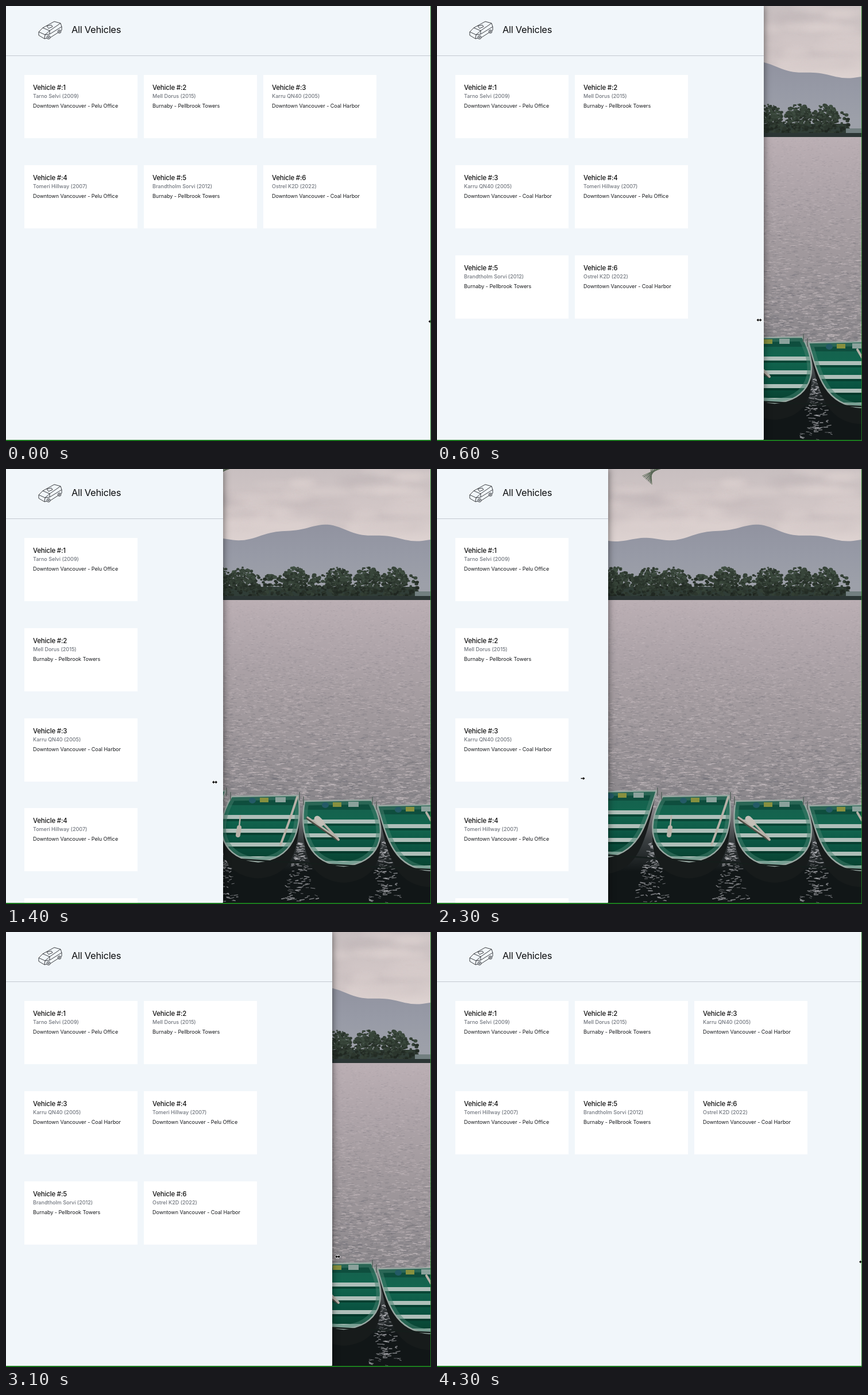
Recreate the animation shown at these times as an HTML page with a canvas. Size 740 by 757 pixels, loop 4.5 s.

```html
<!DOCTYPE html>
<html lang="en">
<head>
<meta charset="utf-8">
<title>All Vehicles</title>
<style>
  html, body { margin: 0; width: 100%; height: 100%; overflow: hidden; }
  #stage { position: absolute; left: 0; top: 0; width: 740px; height: 757px; overflow: hidden; font-family: Inter, Roboto, sans-serif; }
  #stage canvas { position: absolute; left: 0; top: 0; }
  #panel { position: absolute; left: 0; top: 0; height: 756px; overflow: hidden; background: #f1f6fa; box-shadow: 0 0 13px rgba(0,0,0,.55); border-bottom-right-radius: 3px; }
  #panel svg { position: absolute; left: 56px; top: 26px; }
  h1 { position: absolute; left: 114px; top: 30px; margin: 0; font-size: 16.5px; line-height: 22px; font-weight: 400; letter-spacing: -.3px; color: #0c0d0f; white-space: nowrap; }
  hr { position: absolute; left: 0; top: 85.5px; width: 100%; height: 1px; margin: 0; border: 0; background: #c3c8d1; }
  .card { position: absolute; width: 196.5px; height: 110px; background: #fff; white-space: nowrap; }
  .card * { position: absolute; left: 15px; margin: 0; line-height: 16px; }
  .card h2 { top: 14px; font-size: 11.4px; font-weight: 500; letter-spacing: -.15px; color: #111; }
  .card p { top: 29px; font-size: 9px; font-weight: 500; color: #70757d; }
  .card span { top: 46px; font-size: 9px; letter-spacing: -.03px; color: #16181b; }
  #cursor { position: absolute; left: -6px; top: -5px; }
  #edge { position: absolute; inset: 0; border: solid #1b7a1e; border-width: 0 1px 2px 0; }
</style>
</head>
<body>
<div id="stage">
  <canvas id="photo" width="740" height="757"></canvas>
  <div id="panel">
    <svg width="43" height="34" fill="none" stroke="#25282c" stroke-width=".9" stroke-linejoin="round">
      <path d="M8 12 28 1 39 4 20 17ZM8 12 1 19 12 24 20 17M1 19V25L11 31 15 30M12 24 11 31M20 17 20 23 12 24M39 4 41 10 20 23M41 10V16L39 18M21 29 35 20M15 9 23 7 25 10 18 13Z"/>
      <circle cx="18" cy="28.5" r="3"/><circle cx="18" cy="28.5" r="1"/>
      <circle cx="37" cy="18.5" r="2.8"/><circle cx="37" cy="18.5" r="1"/>
    </svg>
    <h1>All Vehicles</h1>
    <hr>
  </div>
  <svg id="cursor" width="12" height="10" stroke="#fff" stroke-width="1.2" paint-order="stroke" fill="#000">
    <path id="arrow"/>
  </svg>
  <div id="edge"></div>
</div>
<script>
const W = 740, H = 757, LEFT = 285, SHORE = 228, LOOP = 4500, STEP = 100;
const $ = id => document.getElementById(id);
const g = $('photo').getContext('2d');

let seed = 11;
const rnd = () => (seed = (seed * 16807) % 2147483647) / 2147483647;
const range = (a, b) => a + (b - a) * rnd();
const repeat = (n, draw) => { for (let i = 0; i < n; i++) draw(i); };

function shade(y0, y1, colors) {
  const s = g.createLinearGradient(0, y0, 0, y1);
  colors.forEach((c, i) => s.addColorStop(i / (colors.length - 1), c));
  return s;
}
function ellipse(x, y, rx, ry, color) {
  g.fillStyle = color;
  g.beginPath();
  g.ellipse(x, y, rx, ry, 0, 0, 7);
  g.fill();
}
function rect(x, y, w, h, color) {
  g.fillStyle = color;
  g.fillRect(x, y, w, h);
}
function line(width, color, x0, y0, x1, y1, sag = 0) {
  g.lineWidth = width;
  g.strokeStyle = color;
  g.beginPath();
  g.moveTo(x0, y0);
  g.quadraticCurveTo((x0 + x1) / 2, (y0 + y1) / 2 + sag, x1, y1);
  g.stroke();
}

function sky() {
  rect(0, 0, W, 240, shade(0, 130, ['#c8bfc0', '#d1c6c6', '#ded3d1']));
  g.filter = 'blur(6px)';
  repeat(45, () => ellipse(range(LEFT, W), range(0, 105), range(20, 70), range(3, 8),
    rnd() < .45 ? 'rgba(182,173,176,.3)' : 'rgba(233,221,217,.32)'));
  g.filter = 'none';
}

function hills() {
  const ridge = x => 123 - 24 * Math.exp(-(((x - 545) / 85) ** 2)) + 3 * Math.cos((x - 412) / 16);
  g.beginPath();
  g.moveTo(LEFT, SHORE);
  for (let x = LEFT; x <= W; x += 5) g.lineTo(x, ridge(x));
  g.lineTo(W, SHORE);
  g.fillStyle = shade(98, 200, ['#9193a0', '#979aa6', '#9da0a9']);
  g.fill();
}

function trees() {
  // Lit leaves near the top, dark ones towards the shore.
  const leaf = (x, y, r) => {
    const v = range(30, 58) + (SHORE - y) * .38;
    ellipse(x, y, r, r * .8, `rgb(${v * .85},${v * 1.05},${v * .88})`);
  };
  rect(LEFT, 205, 430, 23, '#303d37');
  repeat(900, () => leaf(range(LEFT, 716), range(184, 222), range(1.5, 4)));
  for (const x of [311, 372, 412, 503, 578, 630, 676])
    repeat(220, () => {
      const a = range(0, 6.3), d = 22 * Math.sqrt(rnd());
      leaf(x + Math.cos(a) * d, 193 + Math.sin(a) * d, range(1.2, 3.2));
    });
  rect(712, 213, 28, 14, '#727f80');
  rect(LEFT, 221, W - LEFT, 7, '#2c3635');
}

function water() {
  rect(0, SHORE, W, 362, shade(SHORE, 590, ['#bbafb4', '#aea4a9', '#a39b9f', '#989296', '#89868a']));
  rect(0, 590, W, H - 590, shade(590, 700, ['#89868a', '#3b4042', '#111617']));
  g.lineCap = 'round';
  repeat(7000, () => {
    const d = rnd(), x = range(LEFT, W), y = SHORE + 1 + 365 * d, len = (1.5 + 6 * d) * range(.4, 1.6);
    const color = rnd() < .5 ? `rgba(221,209,212,${.2 + .2 * d})` : `rgba(104,104,112,${.15 + .2 * d})`;
    line(.6 + d * .9, color, x, y, x + len, y + range(-1, 1) * d, -d);
  });
  for (const cx of [372, 510, 658])
    repeat(110, () => {
      const y = range(650, 754), x = cx + range(-1, 1) * (3 + (y - 650) * .28);
      line(range(.7, 1.9), 'rgba(196,196,202,.6)', x, y, x + range(2, 8), y + range(-2, 2));
    });
}

function boat(i) {
  const cx = 324 + 127 * i, top = 562 + 8 * i, lean = 22 * i - 34, bx = cx + lean, by = 676 + 7.5 * i;
  const side = cx + lean * 1.2;
  const outline = drop => {
    g.beginPath();
    g.moveTo(cx - 58, top);
    g.lineTo(cx + 58, top - 2);
    g.bezierCurveTo(side + 80, top + 60 + drop, bx + 60, by - 4 + drop, bx, by + drop);
    g.bezierCurveTo(bx - 60, by - 4 + drop, side - 80, top + 60 + drop, cx - 58, top);
    g.closePath();
  };
  outline(29);
  g.fillStyle = '#171b1b';
  g.fill();
  outline(0);
  g.fillStyle = shade(top, by, ['#17604d', '#12664f', '#0a5341', '#08402f']);
  g.fill();
  g.save();
  g.clip();
  rect(cx - 100, top, 200, 15, 'rgba(9,58,46,.5)');
  repeat(4, k => {
    const y = top + 32 + 24 * k;
    rect(cx - 100, y, 200, 7, '#aebfb9');
    rect(cx - 100, y + 7, 200, 4, 'rgba(3,40,31,.5)');
  });
  outline(0);
  g.lineWidth = 15;
  g.strokeStyle = 'rgba(70,128,110,.5)';
  g.stroke();
  g.restore();
  outline(0);
  g.lineWidth = 2.4;
  g.strokeStyle = '#98a8a2';
  g.stroke();
  ellipse(cx - 22, top + 7, 6, 5, '#245a66');
  rect(cx - 9, top + 2, 15, 8, '#87903f');
  rect(cx + 18, top + 1, 18, 9, '#8ba29c');
  for (const s of [-60, 60]) line(2, '#656d6a', cx + s, top + 6, cx + s, top - 7);
}

function boats() {
  repeat(4, boat);
  const wood = '#b7b1a8';
  line(4, wood, 478, 654, 507, 571, 4);
  line(2.5, wood, 408, 604, 405, 632);
  line(8, wood, 406, 624, 404, 637);
  line(5, '#4b4b43', 525, 608, 578, 645);
  line(3, wood, 525, 606, 578, 643);
  line(4, wood, 548, 612, 579, 645);
  line(11, '#c4c0b8', 542, 609, 549, 616);
  line(4, wood, 732, 598, 742, 615);
  line(2.5, '#151d1b', LEFT, 671, W, 697, 3);
}

function leaves() {
  repeat(9, i => line(1.2, i % 2 ? '#48574a' : '#6a7762', 396 - i * 3, -2, 358 + i * 2, 12 + i * 1.8, -3));
}

[sky, hills, trees, water, boats, leaves].forEach(draw => draw());

const places = ['Downtown Vancouver - Pelu Office', 'Burnaby - Pellbrook Towers', 'Downtown Vancouver - Coal Harbor'];
const cars = ['Tarno Selvi (2009)', 'Mell Dorus (2015)', 'Karru QN40 (2005)', 'Tomeri Hillway (2007)', 'Brandtholm Sorvi (2012)', 'Ostrel K2D (2022)'];
const cards = cars.map((car, i) => {
  const card = document.createElement('div');
  card.className = 'card';
  card.innerHTML = `<h2>Vehicle #:${i + 1}</h2><p>${car}</p><span>${places[i % 3]}</span>`;
  return $('panel').appendChild(card);
});

// Key poses of the drag: time, panel width, pointer x, pointer y.
const drag = [
  [0, 740, 740, 549],
  [600, 569, 561, 546.5],
  [1400, 378, 363.5, 545],
  [1800, 298, 264, 541],
  [2400, 298, 252, 538],
  [2800, 412, 441, 554.5],
  [3000, 547, 557, 563],
  [3500, 653, 659.5, 573.5],
  [4100, 740, 741, 574],
  [LOOP, 740, 738, 574],
];

function pose(t) {
  const i = drag.findIndex(k => k[0] > t), a = drag[i - 1], b = drag[i];
  const f = (t - a[0]) / (b[0] - a[0]);
  return a.map((v, j) => v + (b[j] - v) * f);
}

const BOTH = 'M1.5 5 4.5 2.3V4.2H7.5V2.3L10.5 5 7.5 7.7V5.8H4.5V7.7Z';
const RIGHT = 'M2.5 4.2H6.5V2.3L9.5 5 6.5 7.7V5.8H2.5Z';

function render(now) {
  const t = Math.min(Math.floor(now % LOOP / STEP) * STEP, 4300);
  const [, width, x, y] = pose(t);
  const cols = width >= 676 ? 3 : width >= 468 ? 2 : 1;
  $('panel').style.width = width + 'px';
  cards.forEach((card, i) => {
    card.style.left = 32 + i % cols * 208 + 'px';
    card.style.top = 120 + Math.floor(i / cols) * 156.8 + 'px';
  });
  $('cursor').style.transform = `translate(${x}px, ${y}px)`;
  // At its narrowest the panel can only be pulled to the right.
  $('arrow').setAttribute('d', width <= 298 ? RIGHT : BOTH);
}

const start = performance.now();
function tick() {
  render(performance.now() - start);
  requestAnimationFrame(tick);
}
tick();
</script>
</body>
</html>
```
